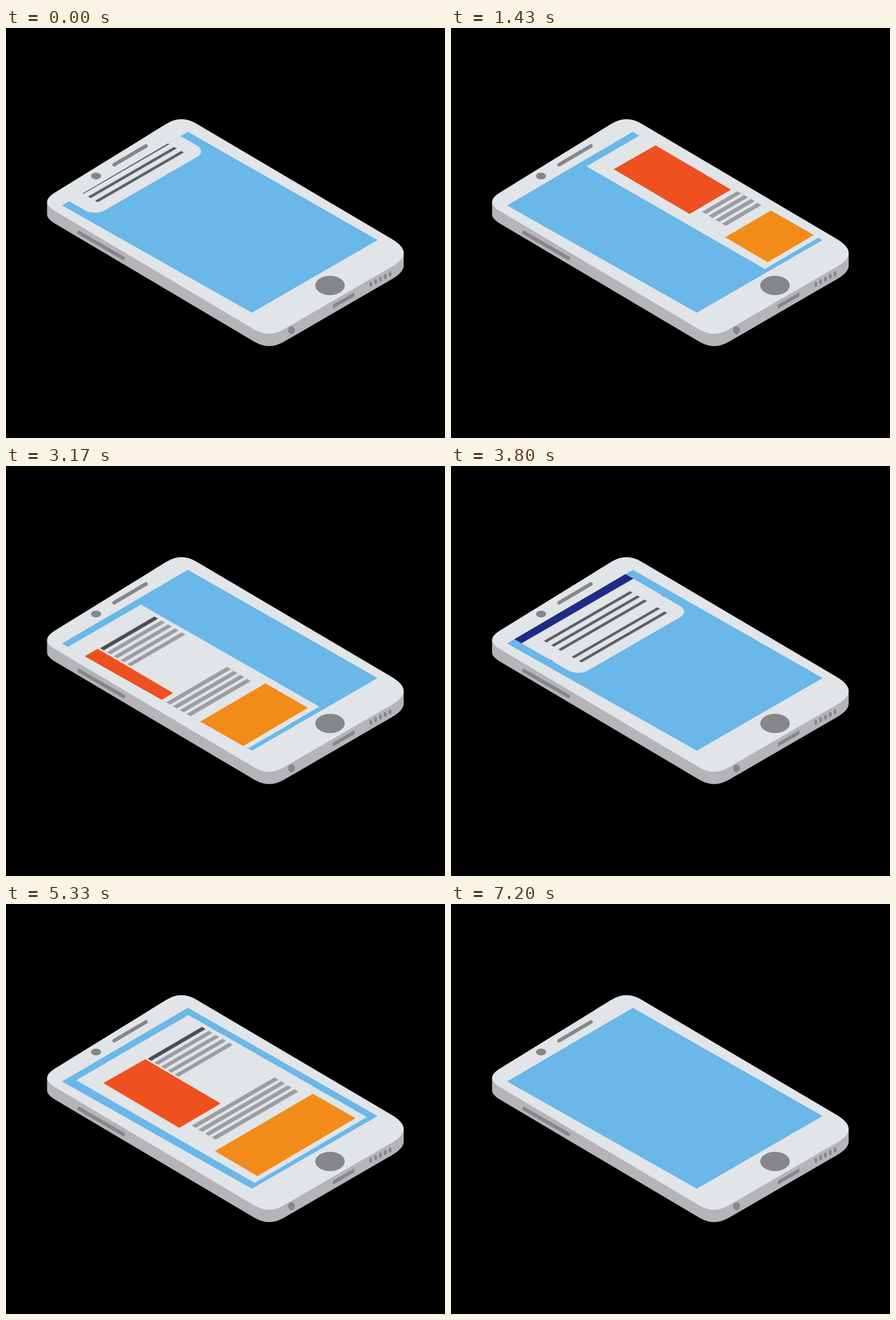
Write an HTML page without scripts that moves like this. It is 775 px wide and 723 px high and loops after 7.23 s.

```html
<!DOCTYPE html>
<html lang="en">
<head>
<meta charset="utf-8">
<title>Phone screens</title>
<style>
html, body { margin: 0; width: 100%; height: 100%; overflow: hidden; background: #000; }
svg { display: block; width: 775px; height: 723px; }

.face, .paper { fill: #e1e5e7; }
.side { fill: #b5b5b9; }
.part { fill: #85878a; }
.groove { fill: none; stroke: #85878a; stroke-width: 6.5; stroke-linecap: round; }
.glass { fill: #6ab7ea; }
.text { fill: none; stroke: #5d5f63; stroke-width: 5.5; }
.rows { fill: #9b9da0; }

/* in-out cubic for every slide; snaps happen while hidden */
.navy, .red, .page {
  --slide: cubic-bezier(.65, 0, .35, 1);
  --settle: cubic-bezier(.33, 1, .68, 1);
  animation: 7230ms infinite;
  animation-timing-function: var(--slide);
}
.navy { animation-name: navy; }
.red { animation-name: red; }
.page { animation-name: page; }

@keyframes navy {
  0% { transform: translate(0, -53px); animation-timing-function: var(--settle); }
  3.361%, 10.277% { transform: translate(0, 0); }
  17.192% { transform: translate(-257px, 0); animation-timing-function: step-end; }
  47.898% { transform: translate(0, -115px); }
  54.813%, 61.66% { transform: translate(0, 0); }
  68.575%, 100% { transform: translate(-257px, 0); }
}
@keyframes red {
  0% { transform: translate(0, -138px); animation-timing-function: linear; }
  .498% { transform: translate(0, -100px); animation-timing-function: var(--settle); }
  3.956%, 13.32% { transform: translate(0, 0); }
  20.235% { transform: translate(-257px, 0); animation-timing-function: step-end; }
  48.451% { transform: translate(0, -200px); }
  55.367%, 64.703% { transform: translate(0, 0); }
  71.618%, 100% { transform: translate(-257px, 0); }
}
@keyframes page {
  0%, 16.362% { transform: translate(233px, -135px); }
  23.278%, 40.802% { transform: translate(0, 0); }
  47.718% { transform: translate(-233px, 135px); animation-timing-function: step-end; }
  55%, 67.746% { transform: translate(233px, -135px); }
  74.661%, 92.185% { transform: translate(0, 0); }
  99.101%, 100% { transform: translate(-233px, 135px); }
}
</style>
</head>
<body>
<svg viewBox="0 0 775 723">
  <defs>
    <clipPath id="screen"><path d="M99 313L321 183 656 374 434 502z"/></clipPath>
    <path id="short" d="M246 275l96-56 6.5 3.8-96 56z"/>
    <path id="long" d="M324 393l146-85 7 4-146 85z"/>
    <ellipse id="hole" rx="2.5" ry="4.6"/>
  </defs>

  <!-- body -->
  <path class="side" d="M72.5 306V329Q72.5 336 85 344L439 553.5Q465 568.5 491 553L681 443Q702 431 702 419V397z"/>
  <path class="face" d="M283 169Q309 153 335 168L681 372Q723 397 681 421L491 531Q465 547 439 532L85 322Q60 307 85 291z"/>
  <path class="groove" d="M191 241L247 208M129 361L207 406"/>
  <g class="part">
    <ellipse cx="159" cy="261" rx="9" ry="6"/>
    <ellipse cx="572" cy="454" rx="26" ry="17"/>
    <ellipse cx="504" cy="533" rx="6" ry="7"/>
    <path d="M577 488L615 466V473L577 495z"/>
    <use href="#hole" x="644" y="452"/>
    <use href="#hole" x="652.5" y="447.4"/>
    <use href="#hole" x="661" y="442.8"/>
    <use href="#hole" x="669.5" y="438.2"/>
    <use href="#hole" x="678" y="433.6"/>
  </g>

  <path class="glass" d="M99 313L321 183 656 374 434 502z"/>

  <g clip-path="url(#screen)">
    <!-- cards, in an isometric plane -->
    <g transform="matrix(.866 -.5 .866 .5 99 313)">
      <g class="red">
        <path class="paper" d="M15 128H242.5V162a20 20 0 0 1-20 20H35a20 20 0 0 1-20-20z"/>
        <path fill="#ee1b1f" d="M15 116.5H242.5V129H15z"/>
        <path class="text" d="M42.5 143.8H217M42.5 158.8H217"/>
      </g>
      <g class="navy">
        <path class="paper" d="M15 29H243V85a20 20 0 0 1-20 20H35a20 20 0 0 1-20-20z"/>
        <path fill="#1f2a86" d="M15 13.3H243V30.2H15z"/>
        <path class="text" d="M42 51.5H217.5M42 66.5H217.5M42 81H217.5"/>
      </g>
    </g>

    <!-- article -->
    <g class="page">
      <path class="paper" d="M318 198L633 378 435 494 120 313z"/>
      <path fill="#ee501f" d="M168 318L242 276 375 354 302 397z"/>
      <path fill="#f28b19" d="M365 438L538 337 613 380 440 482z"/>
      <use href="#short" fill="#4a4c50"/>
      <g class="rows">
        <use href="#short" x="12" y="7"/>
        <use href="#short" x="24" y="14"/>
        <use href="#short" x="36" y="21"/>
        <use href="#short" x="48" y="28"/>
        <use href="#long"/>
        <use href="#long" x="11.7" y="7"/>
        <use href="#long" x="23.4" y="14"/>
        <use href="#long" x="35" y="21"/>
      </g>
    </g>
  </g>
</svg>
</body>
</html>
```
